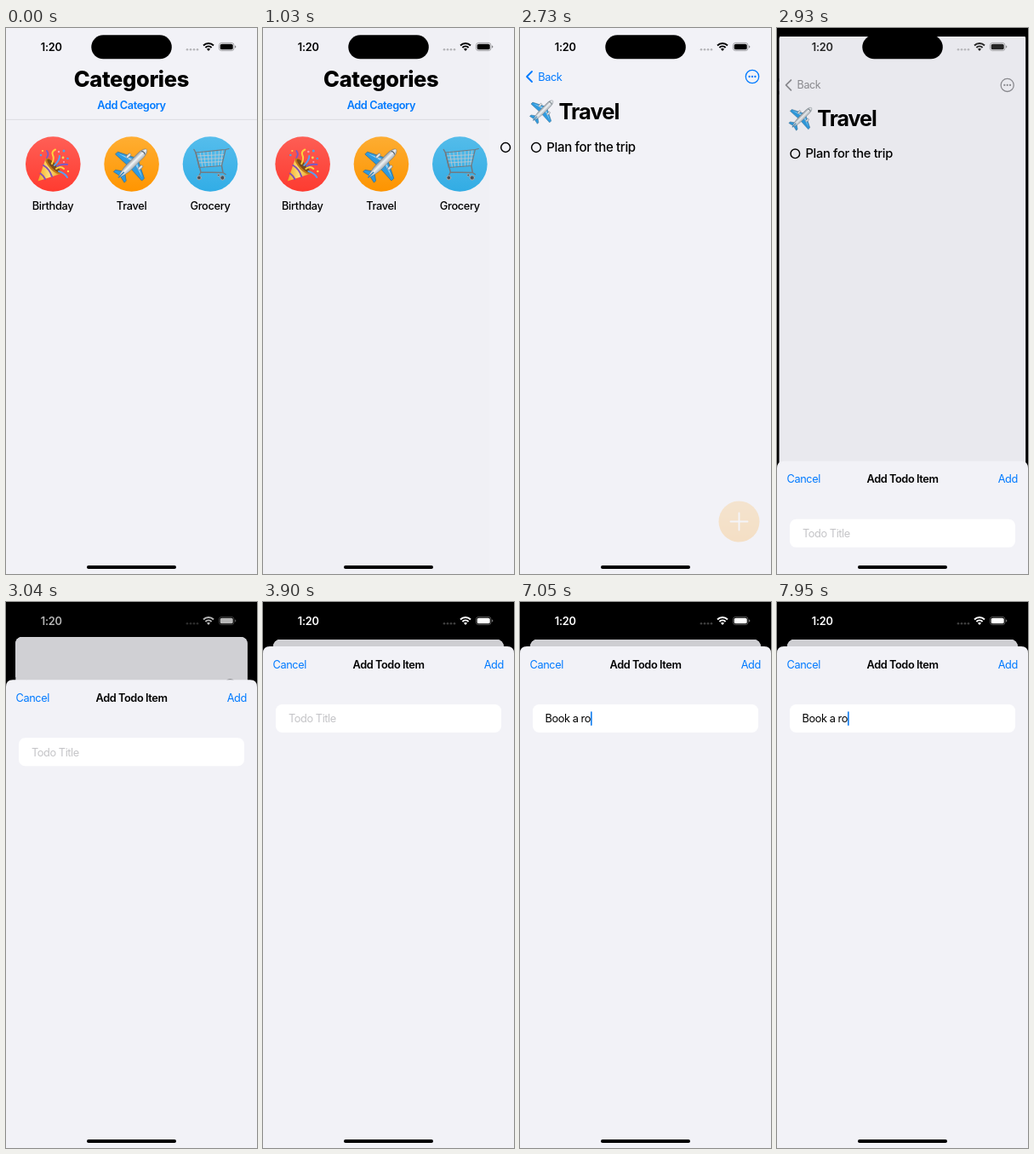
Write an HTML page that moves like this. It is 295x640 px and loops after 8000 ms.

```html
<!DOCTYPE html>
<html lang="en">
<head>
<meta charset="utf-8">
<title>Todo app</title>
<style>
  html, body { margin: 0; width: 100%; height: 100%; overflow: hidden; background: #000; }
  svg { display: block; width: 100vw; height: 100vh; }
  text { font: 400 12.77px Inter, "Liberation Sans", sans-serif; letter-spacing: -.033em; white-space: pre; }
  .mid { text-anchor: middle; }
  .semi { font-weight: 600; }
  .link { fill: #007aff; }
  .label { font-weight: 500; letter-spacing: -.024em; }
  .heavy { font-size: 25.5px; font-weight: 800; letter-spacing: -.014em; }
  .title { font-size: 25.5px; font-weight: 700; letter-spacing: -.04em; }
  .item { font-size: 15px; font-weight: 500; letter-spacing: -.022em; }
  .clock { font-weight: 600; letter-spacing: -.02em; }
  .line { fill: none; stroke-linecap: round; stroke-linejoin: round; }
</style>
</head>
<body>
<svg viewBox="0 0 295 640" preserveAspectRatio="none">
  <defs>
    <linearGradient id="red" x2="0" y2="1"><stop stop-color="#ff5f56"/><stop offset="1" stop-color="#ff3b30"/></linearGradient>
    <linearGradient id="orange" x2="0" y2="1"><stop stop-color="#ffae32"/><stop offset="1" stop-color="#ff9500"/></linearGradient>
    <linearGradient id="blue" x2="0" y2="1"><stop stop-color="#55bdec"/><stop offset="1" stop-color="#32ade6"/></linearGradient>
    <linearGradient id="metal"><stop stop-color="#8e979f"/><stop offset=".45" stop-color="#f1f4f6"/><stop offset="1" stop-color="#aab2b9"/></linearGradient>
    <linearGradient id="gold"><stop stop-color="#f3a81c"/><stop offset=".5" stop-color="#ffe07a"/><stop offset="1" stop-color="#e39a17"/></linearGradient>
    <clipPath id="cardClip"><rect id="cardShape" width="295" height="640"/></clipPath>

    <g id="plane" transform="rotate(45)">
      <path fill="#2f9be0" stroke="#3d6c8c" stroke-width=".7" d="M-2-9-22 1v4L-2 4H2L22 5V1L2-9zM-2 13-9 18v3l9-2 9 2v-3L2 13z"/>
      <path fill="#8fd0f5" d="M-3-6-20 2-3-3zM3-6 20 2 3-3z"/>
      <g fill="url(#metal)" stroke="#6c757c" stroke-width=".5">
        <rect x="-11.5" y="-8" width="3.4" height="6.5" rx="1.6"/>
        <rect x="8.1" y="-8" width="3.4" height="6.5" rx="1.6"/>
        <path d="M0-25C3-24 4.2-19 4.2-15V4C4 11 2 18 0 22-2 18-4 11-4.2 4V-15C-4.2-19-3-24 0-25z"/>
      </g>
      <path class="line" stroke="#4b555d" d="M-2.5-19.5Q0-21.5 2.5-19.5"/>
      <path class="line" stroke="#2f7fb5" stroke-width="1.4" d="M0 13v8"/>
    </g>

    <g id="popper">
      <path fill="url(#gold)" d="M37.5 179.5 46.5 153.5Q59 156 64 171z"/>
      <path class="line" stroke="#8350b5" stroke-width="2" d="M44 161Q51 165 54 174M40.5 170.5Q44 173 46 177"/>
      <ellipse cx="55.5" cy="162" rx="12.5" ry="4.5" transform="rotate(46 55.5 162)" fill="#c77b17"/>
      <ellipse cx="56" cy="161.6" rx="10.5" ry="3" transform="rotate(46 56 161.6)" fill="#7c4c1c"/>
      <g class="line" stroke-width="2">
        <path stroke="#ffd23e" d="M54 159Q57 153 55 149T58 142.500M59 165Q64 161 68 165"/>
        <path stroke="#5a9ff0" d="M57 161Q63 155 63 150M62 168Q69 170 72 175"/>
        <path stroke="#7b5cc4" d="M60 162Q66 159 72 160M48 152Q51 148 48 144"/>
      </g>
      <g fill="#4aa3f0"><circle cx="41" cy="149" r="1.3"/><circle cx="68" cy="144" r="1.5"/><circle cx="72.500" cy="153" r="1.3"/></g>
      <g fill="#ffd84d"><circle cx="67" cy="152" r="1.4"/><circle cx="43" cy="144" r="1.1"/><circle cx="73" cy="168" r="1.2"/></g>
      <g fill="#f8a0b4"><circle cx="62" cy="145" r="1.2"/><circle cx="68" cy="157" r="1.1"/></g>
    </g>

    <g id="cart" class="line" stroke="#737b82">
      <path stroke="#c3cbd1" stroke-width=".8" d="M224 150 256.500 148.500M225 154 255.500 152.500M226 158 254.500 156.500M228 145 231 163M232.500 145 234.500 163M237 144.500 238.500 162.500M241.500 144.500 242 162M246 144 246 162M250.500 143.500 249.500 161.500M254.500 143 252.500 161"/>
      <path stroke-width="1.2" d="M223 146 258 142.500 253.500 161.500 227 163.500zM258 142.500 262 141.500"/>
      <path stroke-width="1.5" d="M221 142.500 223 146 229 169 255 169.500 258 171.500M229 169 227 173M253.500 161.500 255 169.500"/>
      <g fill="#4c5258" stroke="#a5adb3"><circle cx="227" cy="175.500" r="2.400"/><circle cx="254.500" cy="175.500" r="2.600"/><circle cx="250" cy="172.500" r="1.400"/></g>
    </g>
  </defs>

  <rect width="295" height="640"/>

  <g id="card" clip-path="url(#cardClip)">
    <rect width="295" height="640" fill="#f2f2f7"/>
    <g id="home">
      <rect width="295" height="640" fill="#f2f2f7"/>
      <text class="heavy mid" x="147.300" y="69">Categories</text>
      <text class="semi link mid" x="147.500" y="94.700">Add Category</text>
      <path d="M0 107.400H295" stroke="#d9d9de" stroke-width=".8"/>
      <circle cx="55.300" cy="159.500" r="32.300" fill="url(#red)"/>
      <circle cx="147.600" cy="159.500" r="32.300" fill="url(#orange)"/>
      <circle cx="240" cy="159.500" r="32.300" fill="url(#blue)"/>
      <use href="#popper"/>
      <use href="#plane" x="0" y="0" transform="translate(147.600 160)"/>
      <use href="#cart"/>
      <text class="label mid" x="55" y="213">Birthday</text>
      <text class="label mid" x="147.600" y="213">Travel</text>
      <text class="label mid" x="240" y="213">Grocery</text>
      <rect id="homeDim" width="295" height="640"/>
    </g>
    <g id="detail">
      <rect width="295" height="640" fill="#f2f2f7"/>
      <circle cx="19" cy="140" r="5.400" fill="none" stroke="#000" stroke-width="1.500"/>
      <text class="item" x="31.300" y="145.200">Plan for the trip</text>
      <g id="fab">
        <circle cx="257.500" cy="578.500" r="24" fill="url(#orange)"/>
        <path class="line" stroke="#fff" stroke-width="1.900" d="M247.500 578.500h20M257.500 568.500v20"/>
      </g>
    </g>
    <g id="nav">
      <g id="bar" color="#007aff">
        <path class="line" stroke="currentColor" stroke-width="1.800" d="M14 51 8 57 14 63"/>
        <text x="21.300" y="61.600" fill="currentColor">Back</text>
        <circle cx="273" cy="57" r="7.700" fill="none" stroke="currentColor" stroke-width="1.300"/>
        <g fill="currentColor"><circle cx="269.600" cy="57" r="1.150"/><circle cx="273" cy="57" r="1.150"/><circle cx="276.400" cy="57" r="1.150"/></g>
      </g>
      <use href="#plane" transform="translate(26.300 97.500) scale(.7)"/>
      <text class="title" x="45.500" y="106.800">Travel</text>
    </g>
    <rect id="cardDim" width="295" height="640"/>
  </g>

  <g id="sheet">
    <path fill="#f2f2f7" d="M0 700V60Q0 52 8 52H287Q295 52 295 60V700z"/>
    <text class="link" x="11.500" y="77.600">Cancel</text>
    <text class="semi mid" x="147.500" y="77.600">Add Todo Item</text>
    <text class="link" x="259.700" y="77.600">Add</text>
    <rect x="15" y="120" width="265" height="33" rx="7.500" fill="#fff"/>
    <text id="hint" x="30" y="141.300" fill="#c4c4c7">Todo Title</text>
    <text id="entry" x="29.500" y="141.300"></text>
    <rect id="caret" y="128.300" width="1.700" height="16.700" rx=".8" fill="#1a82f0"/>
  </g>

  <rect x="100.300" y="8.300" width="94.500" height="28" rx="14"/>
  <g id="status" fill="currentColor">
    <text class="clock" x="40.800" y="26.600">1:20</text>
    <g opacity=".25"><circle cx="213" cy="25.300" r="1.300"/><circle cx="217" cy="25.300" r="1.300"/><circle cx="221" cy="25.300" r="1.300"/><circle cx="225" cy="25.300" r="1.300"/></g>
    <path fill="none" stroke="currentColor" stroke-width="1.900" d="M232 20.500a8.500 8.500 0 0 1 12 0M234.400 23a5.100 5.100 0 0 1 7.200 0"/>
    <path d="M238 27l-2-2.200a2.800 2.800 0 0 1 4 0z"/>
    <rect x="250.400" y="17.400" width="17.600" height="9.200" rx="3" fill="none" stroke="currentColor" stroke-width=".8" opacity=".4"/>
    <rect x="251.700" y="18.700" width="15" height="6.600" rx="1.900"/>
    <path opacity=".45" d="M269 20.500q1.400.4 1.400 1.500t-1.400 1.500z"/>
  </g>
  <rect x="95" y="630" width="105" height="4" rx="2"/>
</svg>

<script>
const LOOP = 8000;
const PUSH = { start: 1000, steps: [1030, 1130, 1240, 1340, 1440] };
const PRESENT = { start: 2789, steps: [2840, 2940, 3040, 3140, 3250] };
const TYPED = [[5020, 2], [5180, 3], [5360, 4], [5550, 5], [5980, 6], [6300, 7], [6610, 8], [6830, 9]];
const CARET = [[4600, .5], [4710, 1], [7220, .6], [7390, 0], [7620, .5], [7730, 1]];
const PHRASE = "Book a ro";

const el = id => document.getElementById(id);
const clamp = v => Math.min(1, Math.max(0, v));
const put = (id, attrs) => {
  for (const key in attrs) el(id).setAttribute(key, attrs[key]);
};
const show = (id, on) => put(id, { visibility: on ? "visible" : "hidden" });
const valueAt = (list, t) => list.reduce((v, [at, next]) => t >= at ? next : v, 0);

// Milliseconds into a transition, held between the screen's refreshes.
function elapsed({ start, steps }, t) {
  const held = steps.filter(s => s <= t).pop();
  return held === undefined ? 0 : held === steps[steps.length - 1] ? Infinity : held - start;
}

// Critically damped spring from 0 to 1.
function spring(ms) {
  if (ms === Infinity) return 1;
  const x = ms * .0175;
  return 1 - (1 + x) * Math.exp(-x);
}

function drawPush(p) {
  put("home", { transform: `translate(${-88.5 * p} 0)` });
  put("homeDim", { opacity: .1 * p });
  put("detail", { transform: `translate(${295 * (1 - p)} 0)` });
  put("nav", { opacity: clamp((p - .3) / .6) });
}

function drawPresent(ms) {
  const p = spring(ms);
  const light = Math.round(255 * clamp(ms / 350));
  put("card", { transform: `translate(${12 * p} ${44 * p}) scale(${1 - .0814 * p})` });
  put("cardShape", { rx: 9 * p });
  put("cardDim", { opacity: .15 * p });
  put("bar", { transform: `translate(0 ${5 * p})`, color: p > 0 ? "#8e8e93" : "#007aff" });
  put("sheet", { transform: `translate(0 ${588 * (1 - p)})` });
  put("status", { color: `rgb(${light},${light},${light})` });
  show("sheet", p > 0);
}

function drawField(t) {
  const entry = el("entry");
  const text = PHRASE.slice(0, valueAt(TYPED, t));
  if (entry.textContent !== text) entry.textContent = text;
  put("hint", { opacity: text ? 0 : 1 });
  put("caret", {
    x: 29.5 + (text ? entry.getComputedTextLength() : 0),
    opacity: valueAt(CARET, t)
  });
}

function frame() {
  const t = performance.now() % LOOP;
  drawPush(spring(elapsed(PUSH, t)));
  drawPresent(elapsed(PRESENT, t));
  put("fab", { opacity: t >= 2730 ? .2 : 1 });
  drawField(t);
  requestAnimationFrame(frame);
}
frame();
</script>
</body>
</html>
```
